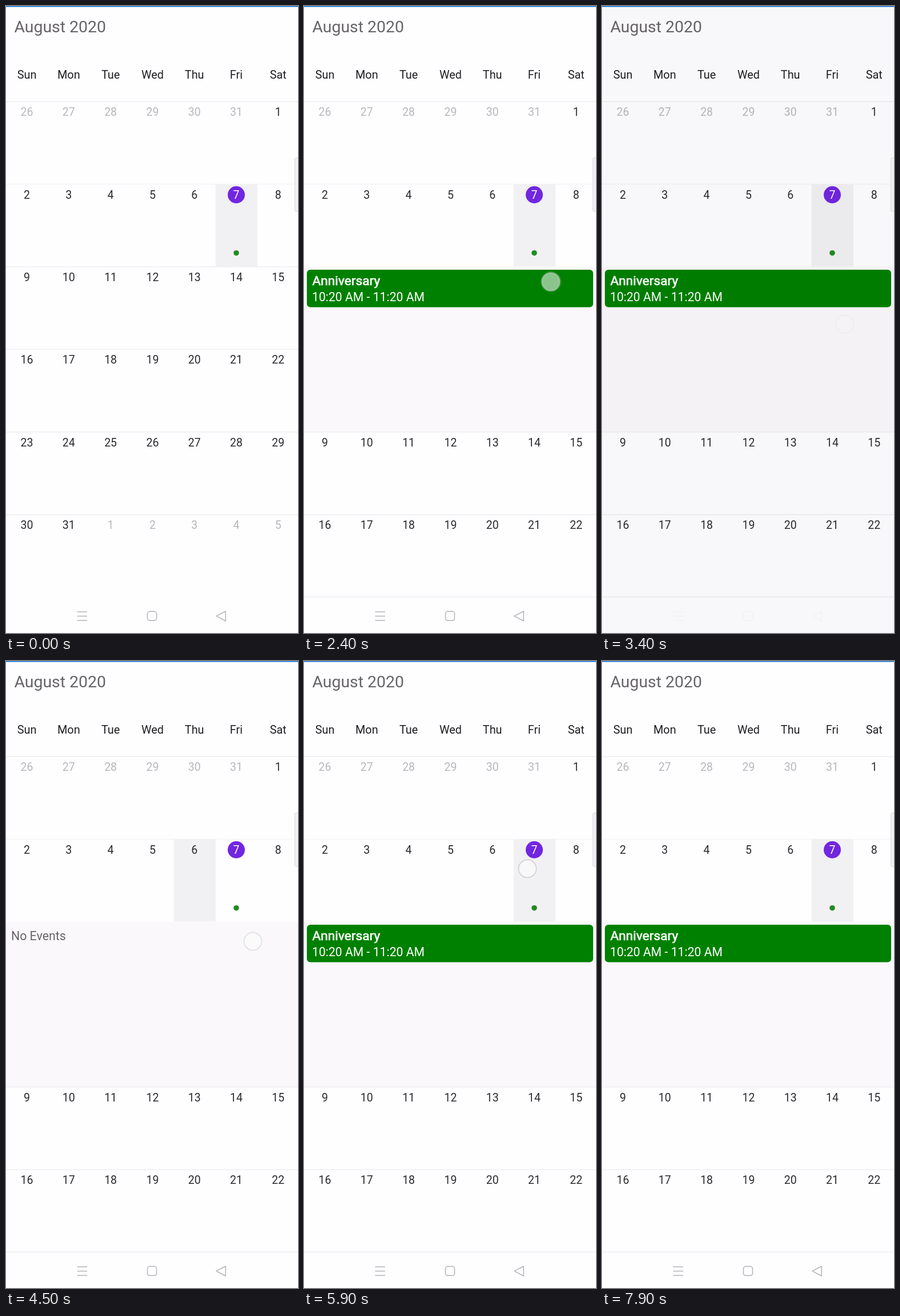
An HTML page with a canvas that plays this animation: 511 px wide and 1096 px high, repeating every 8 s.

```html
<!DOCTYPE html>
<html lang="en">
<head>
<meta charset="utf-8">
<title>Month calendar</title>
<style>
  html, body { margin: 0; width: 100%; height: 100%; overflow: hidden; background: #fefdff; }
  canvas { display: block; width: 511px; height: 1096px; }
</style>
</head>
<body>
<canvas id="stage"></canvas>
<script>
const W = 511, H = 1096, LOOP = 8000, STEP = 100;
const COL = 73.3, TOP = 167, ROW = 144.4, NAV = 1033;
const AGENDA = TOP + 2 * ROW;
const DAYS = ['Sun', 'Mon', 'Tue', 'Wed', 'Thu', 'Fri', 'Sat'];

const dialogs = [
  { from: 2460, to: 3190, title: 'Anniversary' },
  { from: 4620, to: 5260, title: 'No Event' },
  { from: 6590, to: 7260, title: 'Anniversary' }
];

// [down, up, x, y]
const taps = [
  [1160, 1330, 398, 375],
  [2340, 2470, 432, 482],
  [3060, 3200, 425, 556],
  [3870, 4030, 325, 375],
  [4460, 4600, 432, 490],
  [5120, 5260, 425, 552],
  [5680, 5870, 391, 363],
  [6420, 6570, 432, 490],
  [7100, 7260, 432, 552]
];

const canvas = document.getElementById('stage');
const ctx = canvas.getContext('2d');
const dpr = window.devicePixelRatio || 1;
canvas.width = W * dpr;
canvas.height = H * dpr;
ctx.scale(dpr, dpr);

const clamp = v => Math.max(0, Math.min(1, v));
const ramp = (t, a, b) => clamp((t - a) / (b - a));
const ease = p => p * p * (3 - 2 * p);

function rect(x, y, w, h, fill) {
  ctx.fillStyle = fill;
  ctx.fillRect(x, y, w, h);
}

function roundRect(x, y, w, h, r) {
  ctx.beginPath();
  ctx.roundRect(x, y, w, h, r);
}

function disc(x, y, r, fill) {
  ctx.beginPath();
  ctx.arc(x, y, r, 0, Math.PI * 2);
  ctx.fillStyle = fill;
  ctx.fill();
}

function text(str, x, y, size, fill, align = 'left', weight = 400) {
  ctx.font = `${weight} ${size}px Roboto, sans-serif`;
  ctx.textAlign = align;
  ctx.fillStyle = fill;
  ctx.fillText(str, x, y);
}

function header() {
  rect(0, 0, W, H, '#fefdff');
  rect(0, 0, W, 1.6, '#1a73d0');
  text('August 2020', 14.5, 46, 28.4, '#666467');
  DAYS.forEach((d, c) => text(d, 36.5 + c * COL, 127.3, 19.87, '#1f1e20', 'center'));
}

function week(r, y, selected) {
  rect(0, y - 0.5, W, 1.2, r === 1 ? '#f3f2f5' : '#ebeaed');
  for (let c = 0; c < 7; c++) {
    const n = r * 7 + c - 5;
    const x = 36.5 + c * COL;
    const outside = n < 1 || n > 31;
    if (n === selected) rect(c * COL + 0.3, y + 0.5, COL, ROW - 1, '#f1f0f2');
    if (n === 7) {
      disc(x, y + 18.6, 15, '#7126e0');
      disc(x, y + 120.3, 4.8, '#228b22');
    }
    const day = outside ? (n + 30) % 31 + 1 : n;
    const fill = outside ? '#b9b7bb' : n === 7 ? '#fff' : '#2b2a2c';
    text(day, x, y + 25.2, 19.5, fill, 'center');
  }
}

function agenda(height, selected) {
  ctx.save();
  ctx.beginPath();
  ctx.rect(0, AGENDA, W, height);
  ctx.clip();
  rect(0, AGENDA, W, height, '#faf8fb');
  if (selected === 7) {
    roundRect(5, 461, 501, 65.5, 6);
    ctx.fillStyle = '#008000';
    ctx.fill();
    text('Anniversary', 14.5, 488.3, 22.7, '#fff');
    ctx.strokeStyle = '#fff';
    ctx.lineWidth = 0.7;
    ctx.strokeText('Anniversary', 14.5, 488.3);
    text('10:20 AM - 11:20 AM', 14, 516, 21.2, '#fff');
  } else {
    text('No Events', 9, 488, 21.3, '#666467');
  }
  ctx.restore();
}

function month(t) {
  const selected = t >= 4040 && t < 5870 ? 6 : 7;
  const shift = 2 * ROW * ease(ramp(t, 1340, 1680));
  ctx.save();
  ctx.beginPath();
  ctx.rect(0, 0, W, NAV);
  ctx.clip();
  week(0, TOP, selected);
  week(1, TOP + ROW, selected);
  if (shift > 0) agenda(shift, selected);
  for (let r = 2; r < 6; r++) week(r, TOP + r * ROW + shift, selected);
  ctx.restore();
  if (shift > 0) rect(0, NAV - 0.5, W, 1.2, '#ebeaed');
}

function navIcons(color, alpha) {
  ctx.save();
  ctx.globalAlpha = alpha;
  ctx.strokeStyle = color;
  ctx.lineWidth = 1.5;
  ctx.lineJoin = 'round';
  ctx.beginPath();
  for (const y of [1059, 1066.5, 1074]) {
    ctx.moveTo(124.5, y);
    ctx.lineTo(142, y);
  }
  ctx.stroke();
  roundRect(247.5, 1058.3, 16, 16, 4);
  ctx.stroke();
  ctx.beginPath();
  ctx.moveTo(368, 1066.3);
  ctx.lineTo(384.3, 1058);
  ctx.lineTo(384.3, 1075);
  ctx.closePath();
  ctx.stroke();
  ctx.restore();
}

function sideHandle(dim) {
  roundRect(505.5, 265.5, 8, 93.5, 2);
  ctx.fillStyle = dim > 0.5 ? '#d6d4d8' : '#f1f0f2';
  ctx.fill();
  ctx.strokeStyle = dim > 0.5 ? '#a3a1a5' : '#d9d7db';
  ctx.lineWidth = 1;
  ctx.stroke();
}

function dialogBox(title, shown, scale) {
  ctx.save();
  ctx.globalAlpha = shown;
  ctx.translate(255.5, 518);
  ctx.scale(scale, scale);
  ctx.translate(-255.5, -518);
  ctx.shadowColor = 'rgba(0,0,0,.4)';
  ctx.shadowBlur = 30 * dpr;
  ctx.shadowOffsetY = 12 * dpr;
  roundRect(35.5, 440.2, 440, 156, 2.5);
  ctx.fillStyle = '#fff';
  ctx.fill();
  ctx.shadowColor = 'transparent';
  text(title, 69.5, 489.8, 22.7, '#222123');
  text('OK', 400, 560, 19.6, '#f0437f', 'left', 500);
  ctx.restore();
}

function overlay(t) {
  const box = dialogs.find(d => t >= d.from && t < d.to + 260);
  let dim = 0;
  let icons = 1;
  if (box) {
    const enter = 1 - (1 - ramp(t, box.from, box.from + 200)) ** 2;
    const leave = (1 - ramp(t, box.to, box.to + 260)) ** 2;
    dim = enter * leave;
    if (t >= box.to) icons = 0.08;
    rect(0, 0, W, H, `rgba(0,0,0,${0.605 * dim})`);
    const shown = enter * (1 - ramp(t, box.to, box.to + 170));
    if (shown > 0) dialogBox(box.title, shown, 0.92 + 0.08 * enter);
  }
  navIcons(dim > 0.5 ? '#918f93' : '#b4b2b6', icons);
  sideHandle(dim);
}

function touches(t) {
  for (const [down, up, x, y] of taps) {
    const a = ramp(t, down, down + 70) * (1 - ramp(t, up, up + 240));
    if (!a) continue;
    ctx.save();
    ctx.globalAlpha = a;
    disc(x, y, 18.5, 'rgba(255,255,255,.14)');
    disc(x, y, 15.5, 'rgba(255,255,255,.56)');
    ctx.strokeStyle = 'rgba(198,194,203,.75)';
    ctx.lineWidth = 2;
    ctx.stroke();
    ctx.restore();
  }
}

function draw(t) {
  header();
  month(t);
  overlay(t);
  touches(t);
}

const start = performance.now();
function tick() {
  const t = (performance.now() - start) % LOOP;
  draw(Math.floor(t / STEP) * STEP);
  requestAnimationFrame(tick);
}
tick();
</script>
</body>
</html>
```
